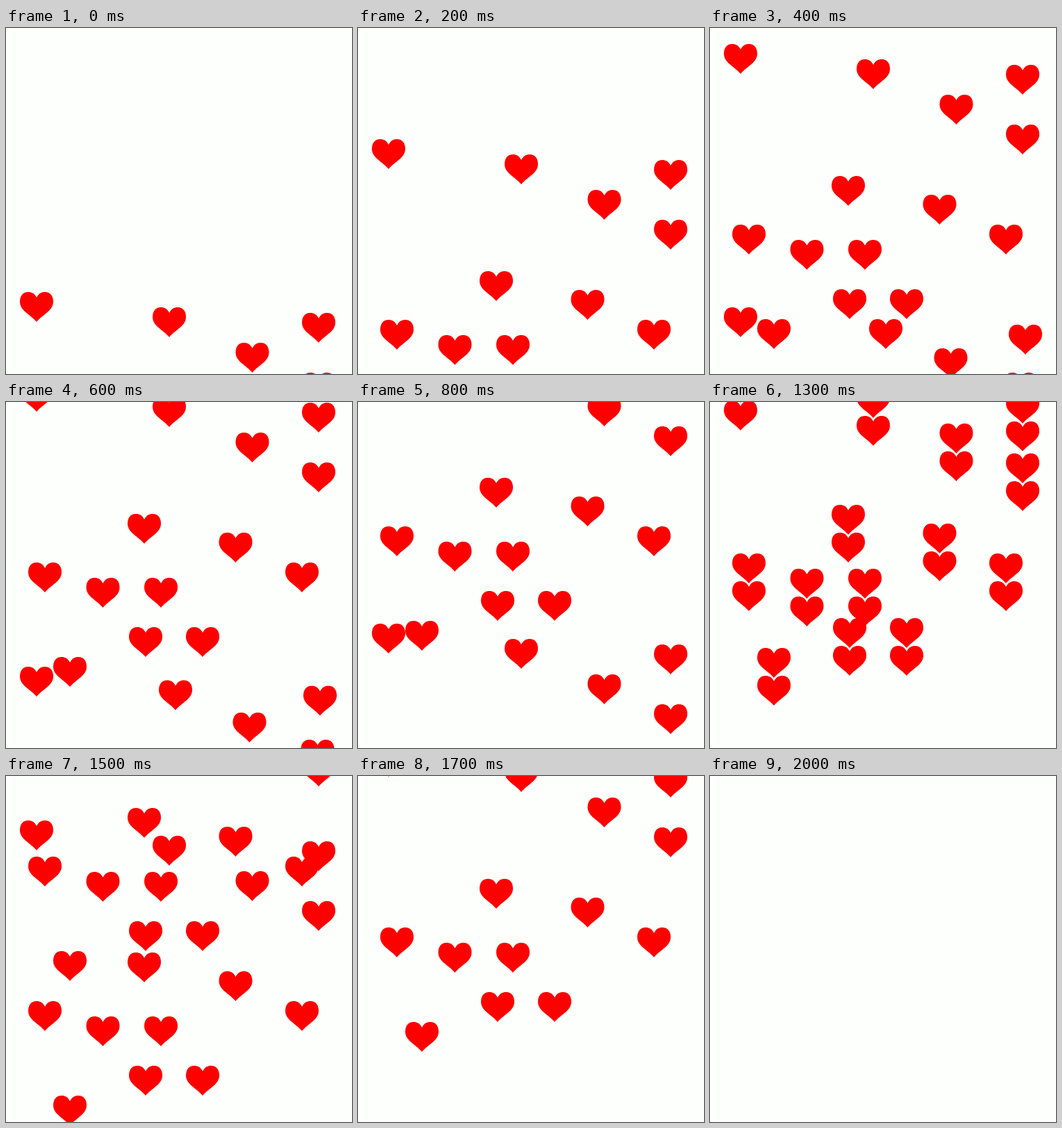
These frames come from a looping animation (498 px wide and 498 px high, 2.1 s). An HTML page with a canvas:

```html
<!DOCTYPE html>
<html lang="en">
<head>
<meta charset="utf-8">
<title>Rising hearts</title>
<style>
  html, body { margin: 0; width: 100%; height: 100%; overflow: hidden; background: #fdfffc; }
  canvas { display: block; }
</style>
</head>
<body>
<canvas id="stage" width="498" height="498"></canvas>
<script>
const ctx = document.getElementById('stage').getContext('2d');
const LOOP = 2100, STEP = 100;

// Origin: centre of the top edge.
const heart = new Path2D(
  'M0 8 C-3 2 -7 0 -12 0 C-20 0 -24 6 -24 14 C-24 27 -9 32 0 43 ' +
  'C9 32 24 27 24 14 C24 6 20 0 12 0 C7 0 3 2 0 8Z');

// Heart positions within one wave: x, y.
const hearts = [
  [44, 380], [235, 402], [354.5, 453], [450, 410], [450, 496],
  [199, 570], [330.5, 597], [56, 640], [426, 640], [139.5, 662],
  [223, 662], [201, 733], [283, 733], [92, 776]
];

// Drift of the leading hearts before they fall into line.
const drift = [[0, 22], [18, 17], [-8, 8], [4, 17], [-3, 0]];

// Each wave: [time, vertical offset] keys; visible from the first to the last.
const waves = [
  { keys: [[0, 0], [100, -120], [200, -220], [300, -300], [400, -357],
           [800, -461], [1000, -505], [1100, -527]] },
  { keys: [[300, 60], [400, 0], [600, -10], [800, -61], [1000, -181],
           [1300, -422], [1500, -524], [1600, -575]], drift: [400, 800] },
  { keys: [[1100, 118], [1200, -130], [1300, -382], [1500, -316],
           [1800, -475], [1900, -528]] }
];

function offsetAt(keys, t) {
  const next = keys.findIndex(k => k[0] >= t);
  if (next < 0 || t < keys[0][0]) return null;
  if (next === 0) return keys[0][1];
  const [t0, y0] = keys[next - 1], [t1, y1] = keys[next];
  return y0 + (y1 - y0) * (t - t0) / (t1 - t0);
}

function drawWave(wave, t) {
  const offset = offsetAt(wave.keys, t);
  if (offset === null) return;
  let sway = 0;
  if (wave.drift) {
    const [from, to] = wave.drift;
    sway = Math.min(1, Math.max(0, (to - t) / (to - from)));
  }
  hearts.forEach(([x, y], i) => {
    const [dx, dy] = drift[i] || [0, 0];
    ctx.setTransform(1, 0, 0, 1, x + dx * sway, y + offset + dy * sway);
    ctx.fill(heart);
  });
}

function frame() {
  const t = Math.floor(performance.now() % LOOP / STEP) * STEP;
  ctx.setTransform(1, 0, 0, 1, 0, 0);
  ctx.fillStyle = '#fdfffc';
  ctx.fillRect(0, 0, 498, 498);
  ctx.fillStyle = '#f00';
  waves.forEach(wave => drawWave(wave, t));
  requestAnimationFrame(frame);
}
frame();
</script>
</body>
</html>
```
